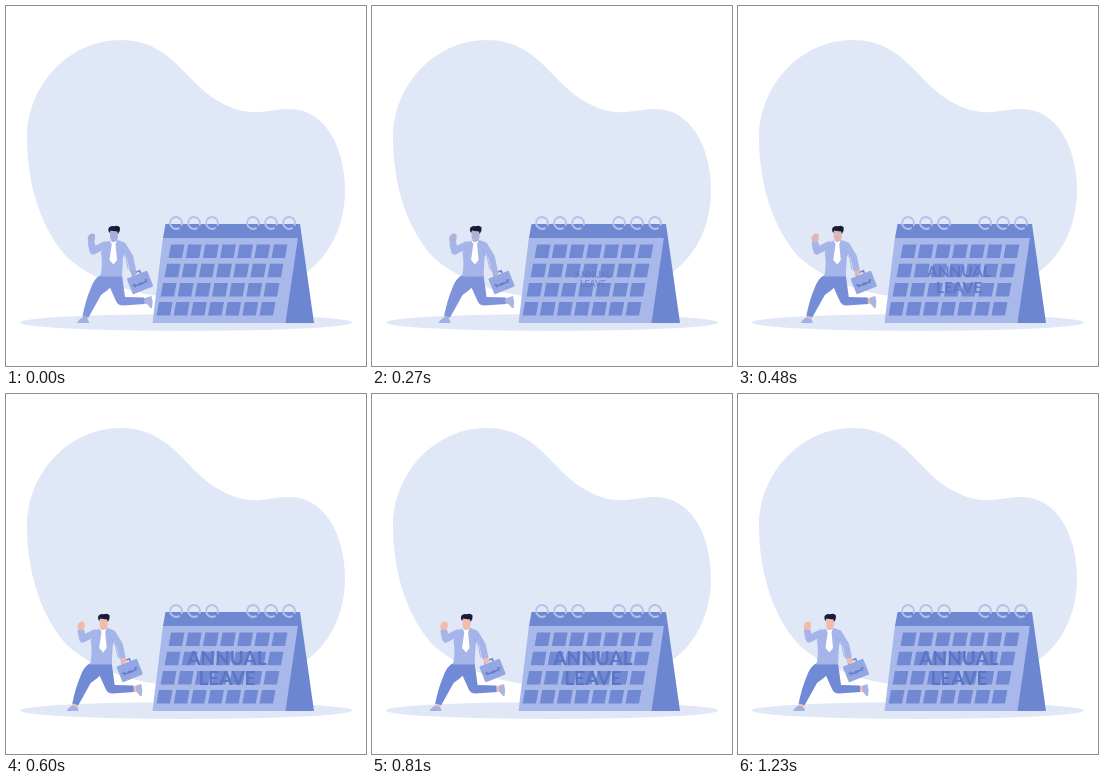
Write an HTML page that moves like this. It is 360 by 360 pixels and loops after 1260 ms.

```html
<!DOCTYPE html>
<html lang="en">
<head>
<meta charset="utf-8">
<title>Annual leave</title>
<style>
html, body { margin: 0; width: 100%; height: 100%; overflow: hidden; background: #fff; }
svg { display: block; width: 100vw; height: 100vh; }
text { font: 700 19px Lato, sans-serif; text-anchor: middle; fill: #5c74c4; }
.skin { fill: var(--skin); }
.limb { fill: none; stroke-linecap: round; stroke-linejoin: round; }
</style>
</head>
<body>
<svg viewBox="0 0 360 360">
  <path fill="#e0e8f7" d="M21 132C21 80 62 34 115 34C166 34 180 78 214 96C228 104 240 107 254 106C266 105 272 103 284 103C318 103 339 140 339 184C339 222 322 252 298 268C260 292 200 293 160 291C120 287 85 272 62 252C36 225 21 180 21 132Z"/>
  <ellipse cx="180" cy="316.5" rx="166" ry="8.5" fill="#e0e8f7"/>

  <path fill="#6d86d1" d="M294 218L308 317H278L288 232Z"/>
  <path fill="#a9b8ea" d="M157 231H292L279.500 317H146.500Z"/>
  <path fill="#6f88d2" d="M159.500 218H294L292 232H157Z"/>
  <path id="cells" fill="#7189d3"/>
  <path id="rings" fill="none" stroke="#b4c1ec" stroke-width="1.900" stroke-linecap="round"/>
  <g id="label">
    <text y="-2.500">ANNUAL</text>
    <text y="17">LEAVE</text>
  </g>

  <g id="man">
    <!-- back leg and shoe -->
    <path fill="var(--pants)" d="M99 269H116L119 291L138 291.500L138.500 298L117 299.500Q112 299.500 110 295L101 275Z"/>
    <path class="skin" d="M138 292L141.500 292V297.500L138 298Z"/>
    <path fill="#a9b4e2" d="M140.500 291.500L145.500 290Q147.500 296 146 302L144.500 302L140.500 297.500Z"/>
    <!-- front leg and shoe -->
    <path fill="var(--pants)" d="M95 269H112Q109 280 95 289L82.500 311.500L76.500 310Q80 293 84.500 283Q88 272 95 269Z"/>
    <path class="skin" d="M77 309.500L82 311L81 314H76.500Z"/>
    <path fill="#a3b0e5" d="M76.500 311.500L82 313.500L83 317H71Q72 314 76.500 311.500Z"/>
    <!-- raised arm -->
    <path class="limb" stroke="#a6b5e9" stroke-width="7" d="M99 239L87 245L85.500 238"/>
    <path class="skin" d="M82 235.500Q81 231 83.500 228.500Q87 226.500 89 229Q89.500 233 88 236Z"/>
    <!-- torso -->
    <path fill="#a6b5e9" d="M98 237Q104 234 109 234Q117 234 119.500 239L117 252L116 270.500H94.500Q97 258 95 247Z"/>
    <path fill="#fff" d="M103.500 234.500L107 236L111 234.500L109.500 238L111 254L107.500 258.500L103.500 254L105.800 238Z"/>
    <!-- head -->
    <path class="skin" d="M104 224H112V230Q112 234 109.500 235.500L106.500 236L104 232Z"/>
    <path fill="#161c38" d="M103.500 227Q101.500 224 103 221.500Q105 219.200 108 220.200Q112 218.600 114 221.500Q114.500 225 112 228L111.500 225.500Q107 225 104.500 224.500Z"/>
    <!-- briefcase -->
    <g transform="translate(134 276.500) rotate(-22)">
      <path fill="none" stroke="#7088d3" stroke-width="1.600" d="M-4 -8V-11H4V-8"/>
      <rect x="-11" y="-8.500" width="22" height="17" rx="1.200" fill="#94a7e3"/>
      <path fill="none" stroke="#647cc8" stroke-width="1.300" d="M-8 0Q0 4 8 0M-6 -1V3M6 -1V3M-2 1H2"/>
    </g>
    <!-- lowered arm -->
    <path class="limb" stroke="#a6b5e9" stroke-width="6.500" d="M117 239.500L124 251L126.500 263"/>
    <path class="limb" stroke="#8fa2df" stroke-width="0.700" d="M115 244L120 252L122 263"/>
    <path class="skin" d="M124 264.500L129.500 263.500Q131.500 266 130 269L126.500 270Z"/>
  </g>
</svg>
<script>
const LOOP = 1260, STEP = 30;
const $ = id => document.getElementById(id);
const clamp = v => Math.max(0, Math.min(1, v));
const smooth = v => v * v * (3 - 2 * v);
const mix = (a, b, k) => `rgb(${a.map((v, i) => Math.round(v + (b[i] - v) * k))})`;

let cells = '';
for (let row = 0; row < 4; row++) {
  for (let col = 0; col < 7; col++) {
    const x = 165 + col * 17.15 - row * 4, y = 238.5 + row * 19.2;
    cells += `M${x} ${y}h13.500l-2.400 13.500h-13.500z`;
  }
}
$('cells').setAttribute('d', cells);
$('rings').setAttribute('d', [170, 188, 206, 247, 265, 283]
  .map(x => `M${x + 3} 222.200A6 6 0 1 1 ${x + 5.7} 219`).join(''));

function draw(t) {
  const u = clamp(t / 1200);
  const run = 0.7 * Math.sin(u * Math.PI / 2) + 0.15 * (1 - Math.cos(u * Math.PI));
  $('man').setAttribute('transform', `translate(${-16 * run} 0)`);

  const warm = smooth(clamp((t - 150) / 500));
  const style = $('man').style;
  style.setProperty('--skin', mix([166, 174, 220], [243, 187, 171], warm));
  style.setProperty('--pants', mix([128, 149, 219], [113, 138, 214], warm));

  const grow = clamp(t / 595);
  $('label').setAttribute('transform', `translate(221 273.500) scale(${grow})`);
  $('label').setAttribute('opacity', clamp(0.3 + grow * 0.7) * (grow > 0 ? 1 : 0));
}

function tick(now) {
  draw(Math.floor((now % LOOP) / STEP) * STEP);
  requestAnimationFrame(tick);
}
draw(0);
requestAnimationFrame(tick);
</script>
</body>
</html>
```
